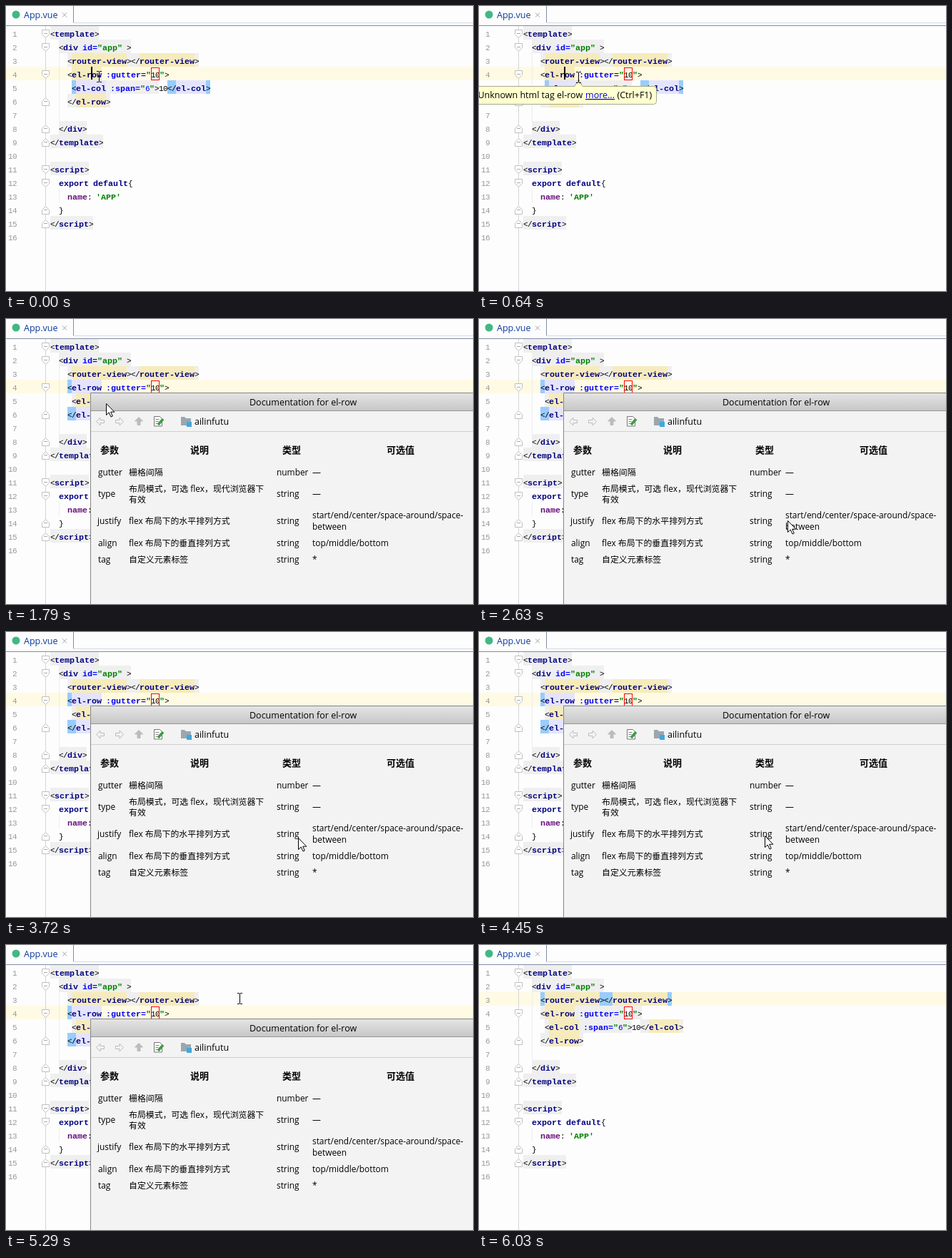
Recreate the animation shown at these times as an HTML page. Size 654x399 px, loop 6.13 s.

```html
<!DOCTYPE html>
<html lang="en">
<head>
<meta charset="utf-8">
<title>Editor quick documentation</title>
<style>
html, body { margin: 0; width: 100%; height: 100%; overflow: hidden; background: #fdfdfd; }
svg { display: block; }
text { white-space: pre; }
.ui { font: 12.5px "Open Sans", "Noto Sans", sans-serif; }
.cell { font: 11.9px "Open Sans", "Noto Sans CJK SC", "Noto Sans CJK", sans-serif; }
.head { font: bold 13px "Noto Sans CJK SC", "Noto Sans CJK", sans-serif; }
.bold { font: bold 11.67px "Liberation Mono", monospace; }
.plain { font: 11px "Liberation Mono", monospace; letter-spacing: -.6px; }
</style>
</head>
<body>
<svg id="stage" width="654" height="399" viewBox="0 0 654 399"></svg>
<script>
const LOOP = 6130, ROW = 19;
const GREY = '#efefef', WHEAT = '#f6ebbc', BLUE = '#99ccff', LILAC = '#e4e4ff';

const rowTop = n => 28 + ROW * (n - 1);
const baseline = n => rowTop(n) + 15;
const rect = (x, y, w, h, fill, more = '') =>
  `<rect x="${x}" y="${y}" width="${w}" height="${h}" fill="${fill}" ${more}/>`;
const path = (d, stroke, fill = 'none', more = '') =>
  `<path d="${d}" stroke="${stroke}" fill="${fill}" ${more}/>`;
const text = (x, y, s, cls, fill = '#000', more = '') =>
  `<text x="${x}" y="${y}" class="${cls}" fill="${fill}" ${more}>${s.replace(/</g, '&lt;')}</text>`;
const group = (id, body) => `<g id="${id}">${body}</g>`;
const mark = (row, x1, x2, fill) => rect(x1, rowTop(row), x2 - x1, ROW, fill);
const caretRow = row => rect(0, rowTop(row), 654, ROW, '#fffae3');

// Token kinds: [colour, bold, background]
const KINDS = {
  p: ['#000', false, GREY], n: ['#00f', false, GREY], x: ['#000', false],
  t: ['#000080', true, GREY], u: ['#000080', true, WHEAT],
  a: ['#00f', true, GREY], s: ['#008000', true, GREY],
  k: ['#000080', true], f: ['#660e7a', true], q: ['#008000', true]
};
// Each line: row, left edge, tokens led by their kind
const CODE = [
  [1, 62, 'p<|ttemplate|p>'],
  [2, 74, 'p<|tdiv|p |aid=|s"app"|p >'],
  [3, 86, 'p<|urouter-view|p></|urouter-view|p>'],
  [4, 86, 'p<|uel-row|p |a:gutter=|s"|x10|s"|p>'],
  [5, 92, 'p<|uel-col|p |a:span=|s"|n6|s"|p>|x10|p</|uel-col|p>'],
  [6, 86, 'p</|uel-row|p>'],
  [8, 74, 'p</|tdiv|p>'],
  [9, 62, 'p</|ttemplate|p>'],
  [11, 62, 'p<|tscript|p>'],
  [12, 74, 'kexport|x |kdefault|x{'],
  [13, 86, "fname|x: |q'APP'"],
  [14, 74, 'x}'],
  [15, 62, 'p</|tscript|p>']
];

const backs = { [GREY]: '', [WHEAT]: '' };
let letters = '';
for (const [row, left, line] of CODE) {
  let x = left;
  for (const token of line.split('|')) {
    const [colour, bold, back] = KINDS[token[0]], s = token.slice(1);
    const end = x + s.length * (bold ? 7 : 6);
    if (back) backs[back] += mark(row, x, end, back);
    letters += text(x, baseline(row), s, bold ? 'bold' : 'plain', colour);
    x = end;
  }
}

function gutter() {
  let out = rect(55, 28, 1, 371, '#d4d4d4');
  for (let n = 1; n <= 16; n++)
    out += text(n > 9 ? 3 : 9, baseline(n), '' + n, 'plain', '#999');
  const fold = (n, dir) => {
    const y = rowTop(n) + 11;
    return path(`M50.5 ${y - 5.5 * dir}h10v${6 * dir}l-5 ${5 * dir}l-5 ${-5 * dir}z`, '#c0c0c0', '#fff') +
      path(`M53 ${y - .5}h5`, '#aaa');
  };
  [1, 2, 4, 11, 12].forEach(n => out += fold(n, 1));
  [6, 8, 9, 14, 15].forEach(n => out += fold(n, -1));
  return out;
}

const guides = rect(74, rowTop(3), 1, 5 * ROW, '#ececec') + rect(74, rowTop(13), 1, ROW, '#ececec');

const EDGE = '#7f8da6';
const tabs = rect(94, 0, 1, 24, EDGE) + rect(94, 23, 560, 1, '#d3dbe6') + rect(0, 27, 654, 1, EDGE) +
  '<circle cx="14" cy="12" r="5.5" fill="#41b883"/>' +
  text(25, 17, 'App.vue', 'ui', '#0a3a9c') + path('M79 9.5l6 6m0-6l-6 6', '#a5a5a5');

const tooltip =
  path('M-8 112.5H134L139.5 102.5L145 112.5H244.500q4 0 4 4V133.500q0 4-4 4H-8z', '#a8a88c', '#ffffcf') +
  text(-1.5, 129, 'Unknown html tag el-row ', 'ui') +
  text(149, 129, 'more...', 'ui', '#00f', 'text-decoration="underline"') +
  text(193.5, 129, '(Ctrl+F1)', 'ui');

function popup() {
  const arrow = (x, y, turn, fill) =>
    path('M-5.500 0L0-5.500V-2H5.500V2H0V5.500z', '#bcbcbc', fill,
      `transform="translate(${x} ${y}) rotate(${turn})"`);
  const cells = [
    [129, 219, 'gutter'], [172, 219, '栅格间隔'], [379, 219, 'number'], [429, 219, '—'],
    [129, 249, 'type'], [172, 242, '布局模式，可选 flex，现代浏览器下'], [172, 257, '有效'],
    [379, 249, 'string'], [429, 249, '—'],
    [128, 287, 'justify'], [172, 287, 'flex 布局下的水平排列方式'], [379, 287, 'string'],
    [429, 279, 'start/end/center/space-around/space-'], [429, 295, 'between'],
    [129, 318, 'align'], [172, 318, 'flex 布局下的垂直排列方式'], [379, 318, 'string'],
    [429, 318, 'top/middle/bottom'],
    [129, 341, 'tag'], [172, 341, '自定义元素标签'], [379, 341, 'string'], [429, 341, '*']
  ];
  const heads = [[132, '参数'], [258, '说明'], [387, '类型'], [533, '可选值']];
  return rect(118, 103, 536, 296, '#f3f3f3') +
    rect(119, 104, 535, 25, 'url(#bar)') + rect(119, 128, 535, 1, '#959595') +
    rect(119, 157, 535, 1, '#d0d0d0') +
    path('M654 103.5H118.5V399', '#858585') +
    text(341, 121, 'Documentation for el-row', 'ui') +
    arrow(132, 143.5, 0, 'none') + arrow(159, 143.5, 180, 'none') + arrow(186, 143, 90, '#bcbcbc') +
    path('M207.500 136.500h8l3 3v10.500h-11z', '#777', '#fff') +
    path('M209.500 140.500h5m-5 3h4m-4 3h3', '#888') +
    path('M213 148l7-8', '#3f9b46', 'none', 'stroke-width="3.5"') +
    path('M245 137h5l2 2h7v10h-14z', 'none', '#9aa7b0') +
    rect(253, 144, 7, 7, '#40a8dc') +
    text(264, 148, 'ailinfutu', 'ui') +
    heads.map(([x, s]) => text(x, 188, s, 'head')).join('') +
    cells.map(([x, y, s]) => text(x, y, s, 'cell')).join('');
}

const $ = id => document.getElementById(id);
$('stage').innerHTML =
  `<defs><linearGradient id="bar" x2="0" y2="1"><stop stop-color="#e4e4e4"/>
   <stop offset="1" stop-color="#c6c6c6"/></linearGradient></defs>` +
  backs[GREY] + group('line4', caretRow(4)) + group('line3', caretRow(3)) + backs[WHEAT] + guides +
  group('colTag', mark(5, 98, 140, LILAC) + mark(5, 238, 280, LILAC) +
    mark(5, 92, 98, BLUE) + mark(5, 226, 238, BLUE) + mark(5, 280, 286, BLUE)) +
  group('rowTag', mark(4, 92, 134, LILAC) + mark(6, 98, 140, LILAC) +
    mark(4, 86, 92, BLUE) + mark(6, 86, 98, BLUE) + mark(6, 140, 146, BLUE)) +
  group('viewTag', mark(3, 86, 92, BLUE) + mark(3, 169, 187, BLUE) + mark(3, 264, 270, BLUE)) +
  letters + rect(203.5, 86.5, 11, 17, 'none', 'stroke="#f00"') +
  gutter() + tabs +
  group('caret4', rect(119, 85, 2, 18, '#000')) +
  group('caret3', rect(269, 66, 2, 18, '#000')) +
  group('tooltip', tooltip) + group('popup', popup()) +
  group('beam', path('M0 .5h3m1 0h3M3.500 1v14M0 15.500h3m1 0h3', '#000')) +
  group('arrow', path('M.5.5V16.500L4.200 13L7 19L9.300 18L6.700 12.200H11.800z', '#000', '#fff'));

// Pointer stops: time, x, y
const BEAM = [[0, 127, 91], [140, 135, 92], [640, 136, 92], [1010, 136, 94], [1520, 136, 96],
  [4930, 320, 86], [5050, 314, 71], [5170, 324, 67]];
const ARROW = [[1670, 139, 112], [1790, 140, 118], [1910, 150, 138], [2030, 166, 160], [2150, 198, 178],
  [2270, 241, 193], [2390, 300, 225], [2510, 375, 256], [2630, 432, 282], [2750, 510, 330],
  [2870, 553, 362], [2990, 434, 328], [3360, 430, 315], [3480, 422, 300], [3600, 414, 283],
  [3720, 409, 288], [3840, 406, 298], [3960, 405, 306], [4080, 405, 307], [4450, 400, 285],
  [4570, 385, 240], [4690, 365, 190], [4810, 340, 140]];

const show = (id, on) => $(id).style.display = on ? '' : 'none';
function place(id, stops, t) {
  const [, x, y] = stops.filter(s => s[0] <= t).pop() || stops[0];
  $(id).setAttribute('transform', `translate(${x} ${y})`);
}

function draw(now) {
  const t = now % LOOP, within = (a, b) => t >= a && t < b;
  const open = within(1670, 5530), closed = t >= 5530;
  show('line4', !closed);
  show('line3', closed);
  show('colTag', t < 1670);
  show('rowTag', open);
  show('viewTag', closed);
  show('caret4', t < 760 || within(1270, 1670));
  show('caret3', within(5530, 6030));
  show('tooltip', within(390, 1670));
  show('popup', open);
  const arrow = within(1670, 4930);
  show('arrow', arrow);
  show('beam', !arrow && t < 5650);
  place('arrow', ARROW, t);
  place('beam', BEAM, t);
  requestAnimationFrame(draw);
}
draw(performance.now());
</script>
</body>
</html>
```
